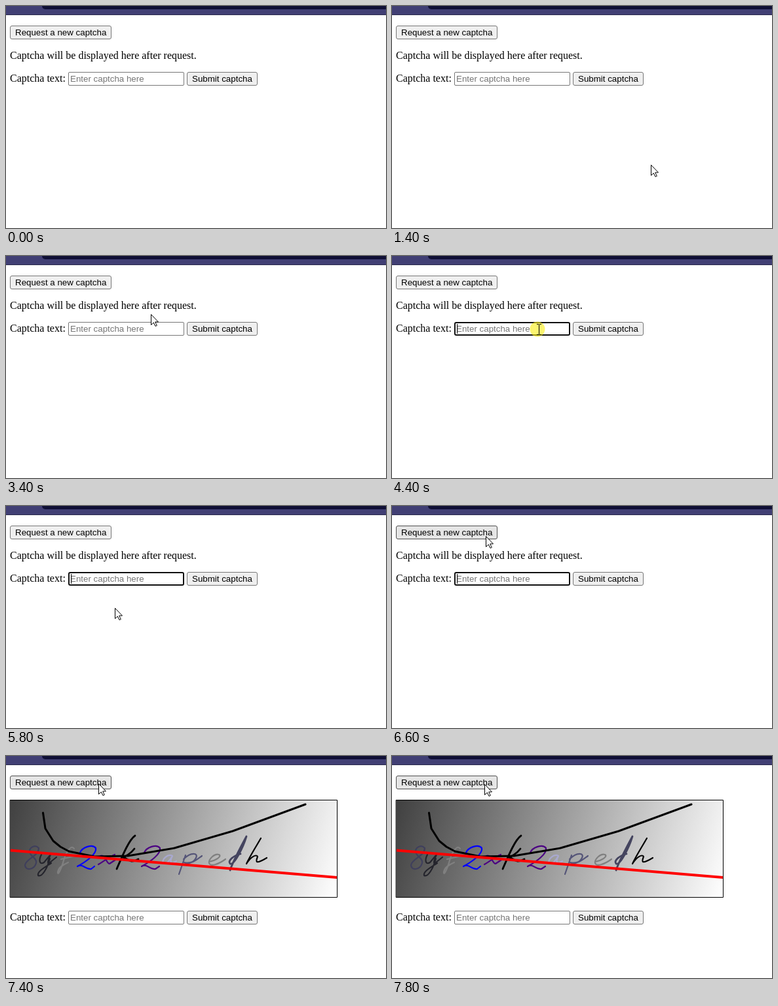
An HTML page that plays this animation: 580 px wide and 340 px high, repeating every 8000 ms.

```html
<!DOCTYPE html>
<html lang="en">
<head>
<meta charset="utf-8">
<title>Captcha form</title>
<style>
  html, body { margin: 0; width: 100%; height: 100%; overflow: hidden; background: #fff; }
  body { position: relative; font: 16px/18px "Liberation Serif", serif; color: #000; }
  body *, svg { position: absolute; white-space: pre; box-sizing: border-box; }
  #toolbar { width: 580px; height: 14px; background: #413f74; border-bottom: 1px solid #2b2a4c; overflow: hidden; }
  #address { left: 55px; top: -10px; width: 540px; height: 15px; background: #0f0f35; border-radius: 5px; }
  .control { height: 21px; border: 1px solid #767676; border-radius: 3px; background: #efefef;
    font: 13.333px/15px "Liberation Sans", sans-serif; padding: 2px 7px; }
  .hover { background: #e5e5e5; border-color: #4f4f4f; }
  .active { background: #f5f5f5; border-color: #8d8d8d; }
  #field { left: 95px; top: 101px; width: 177px; padding: 2px; color: #757575; background: #fff; border-radius: 2px; }
  #field.hover { border-color: #333; }
  #field.focus { border: 2px solid #101010; border-radius: 3px; padding: 1px; }
  #caret { left: 99px; top: 104px; width: 1px; height: 15px; background: #000; }
  #overlay { left: 0; top: 0; }
</style>
</head>
<body>
<div id="toolbar"><div id="address"></div></div>
<div id="request" class="control" style="left:6px;top:30px;width:155px">Request a new captcha</div>
<div id="hint" style="left:6px;top:67px">Captcha will be displayed here after request.</div>

<svg id="captcha" width="580" height="340" fill="none" stroke-linecap="round" stroke-linejoin="round">
  <linearGradient id="shade" gradientUnits="userSpaceOnUse" x1="6" y1="67" x2="506" y2="217">
    <stop stop-color="#404040"/><stop offset="1" stop-color="#fff"/>
  </linearGradient>
  <rect x="6.5" y="67.5" width="499" height="149" fill="url(#shade)" stroke="#000"/>
  <g stroke-width="2.2">
    <path stroke="#3f3f5c" d="M50 141C44 135 36 140 36 146C36 154 48 156 46 164C43 175 29 176 29 167C30 158 50 153 50 141"/>
    <path stroke="#24242c" d="M54 151C49 161 52 167 58 163L68 151C64 160 62 167 67 163L77 155M67 157C63 172 55 186 49 183C47 177 60 170 69 164"/>
    <path stroke="#808080" d="M104 142C100 135 92 146 88 160C84 174 79 184 79 178C80 170 88 166 95 163M84 158L106 153"/>
    <path stroke="#00f" d="M113 148C116 140 132 134 137 141C139 150 122 162 109 169C116 164 122 174 130 173L135 169"/>
    <path stroke="#4b0082" d="M144 153C152 150 153 165 158 165L167 159M166 151C158 154 150 161 141 166"/>
    <path stroke="#000" stroke-width="2.8" d="M197 122C188 128 178 152 169 173M196 142C190 150 182 154 178 155C186 156 188 166 202 158"/>
    <path stroke="#4b0082" d="M211 148C214 140 230 134 235 141C237 150 220 162 207 169C214 164 220 174 228 173L234 169"/>
    <path stroke="#a9a9cf" d="M254 153C247 149 237 159 240 164C245 166 250 160 254 153C250 161 250 168 260 161"/>
    <path stroke="#555578" d="M274 152L264 181M271 158C282 147 294 148 290 156C286 164 276 166 272 163C284 166 292 158 299 153"/>
    <path stroke="#808080" d="M310 162C320 160 330 154 325 151C318 149 309 158 310 164C312 170 324 166 335 158"/>
    <path stroke="#44445f" stroke-width="2.8" d="M358 150C348 152 338 160 342 165C348 168 362 140 367 123C360 136 346 162 342 175"/>
    <path stroke="#000" d="M389 126C382 138 372 154 367 165C374 154 382 150 384 154C382 160 378 168 398 156"/>
  </g>
  <path stroke="#000" stroke-width="3" d="M56.5 87L60 111L72 130L83 139L96 146L135 154L186 153L257 141L346 115L457 74"/>
  <path stroke="red" stroke-width="4" stroke-linecap="butt" d="M7 144.500L505 186"/>
</svg>

<div id="form" style="left:0;top:0">
  <div style="left:6px;top:102px">Captcha text:</div>
  <div id="field" class="control">Enter captcha here</div>
  <div id="caret"></div>
  <div class="control" style="left:276px;top:101px;width:108px">Submit captcha</div>
</div>

<svg id="overlay" width="580" height="340">
  <circle id="click" r="11.5" fill="#f8ec10" fill-opacity=".6"/>
  <g id="pointer">
    <path id="arrow" fill="#fff" stroke="#000" stroke-linejoin="round"
      d="M.5 .5V16.500L4.300 13L7 18.500L9.300 17.500L6.700 12H11.500Z"/>
    <path id="beam" fill="none" stroke="#000" shape-rendering="crispEdges"
      d="M-3 -7.500H0M1 -7.500H4M.5 -7V8M-3 8.500H0M1 8.500H4"/>
  </g>
</svg>

<script>
const LOOP = 8000, STEP = 200;
const FIELD_CLICK = 4400, BUTTON_CLICK = 7200, LOADED = 7400;

// Pointer path: time, x, y
const path = [
  [800, 528, 326], [1800, 307, 188], [2000, 276, 158], [2200, 240, 118],
  [2400, 223, 98], [2800, 219, 72], [3000, 219, 72], [3600, 222, 98],
  [4000, 224, 112], [4600, 224, 112], [4800, 262, 136], [5000, 363, 172],
  [5200, 320, 206], [5400, 227, 206], [5800, 166, 156], [6600, 143, 46],
  [7000, 141, 42], [7600, 141, 42], [7800, 141, 43]
];

const $ = id => document.getElementById(id);
const show = (id, on) => $(id).style.display = on ? "" : "none";
const inside = ([x, y], l, t, r, b) => x >= l && x < r && y >= t && y < b;

function pointerAt(t) {
  const i = path.findIndex(key => key[0] > t);
  if (i < 0) return path.at(-1).slice(1);
  if (i === 0) return [-50, -50];
  const [t0, x0, y0] = path[i - 1], [t1, x1, y1] = path[i];
  const k = (t - t0) / (t1 - t0);
  return [Math.round(x0 + (x1 - x0) * k), Math.round(y0 + (y1 - y0) * k)];
}

function draw(now) {
  const t = Math.floor(now % LOOP / STEP) * STEP;
  const p = pointerAt(t);
  const focus = t >= FIELD_CLICK && t < BUTTON_CLICK;
  const loaded = t >= LOADED;
  const overText = inside(p, 6, 67, 291, 85) || inside(p, 95, 101, 272, 122);

  $("request").classList.toggle("hover", inside(p, 6, 30, 161, 51));
  $("request").classList.toggle("active", t === BUTTON_CLICK);
  $("field").classList.toggle("hover", inside(p, 95, 97, 272, 123));
  $("field").classList.toggle("focus", focus);
  show("caret", focus && (t - FIELD_CLICK) % 1000 < 500);

  show("hint", !loaded);
  show("captcha", loaded);
  $("form").style.top = loaded ? "136px" : "0";

  show("arrow", !overText);
  show("beam", overText);
  $("pointer").setAttribute("transform", `translate(${p})`);
  show("click", t === FIELD_CLICK || t === BUTTON_CLICK);
  $("click").setAttribute("cx", p[0] - (overText ? 2 : 0));
  $("click").setAttribute("cy", p[1]);
  requestAnimationFrame(draw);
}

const start = performance.now();
requestAnimationFrame(now => draw(Math.max(0, now - start)));
</script>
</body>
</html>
```
